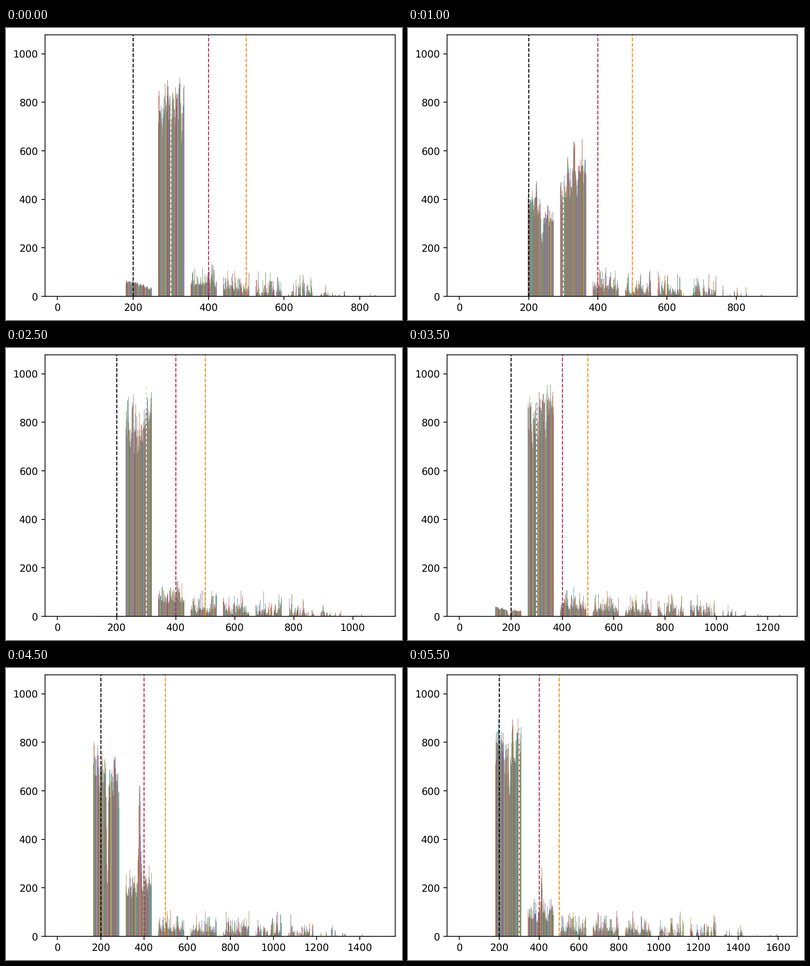
Animation, 872 px wide and 642 px high, one loop 8000 ms. Source, as a matplotlib script:

```python
import numpy as np
import matplotlib.pyplot as plt
from matplotlib.animation import FuncAnimation
from matplotlib.collections import PolyCollection
from matplotlib.colors import to_rgb
from matplotlib.ticker import MultipleLocator

W, H, DPI = 872, 642, 155.4
BINS, COLS = 10, 74
STEP_MS, FRAMES = 500, 16

# Largest value at each step; the bins always split 0..top evenly
TOPS = [860, 920, 939, 1066, 1028, 1100, 1267, 1264, 1407, 1504, 1588, 1631]

U = np.linspace(0, 1, COLS)
CYCLE = np.array([to_rgb(f"C{i}") for i in range(10)])

plt.rcParams["text.hinting"] = "none"


def smooth(rng, size=COLS):
    """Random wave between 0 and 1 that drifts over a few columns."""
    wave = np.convolve(rng.random(size + 4), [.1, .2, .4, .2, .1], "valid")
    return (wave - wave.min()) / np.ptp(wave)


def share_below(value, centre):
    """Part of each series below a value: a steep rise and a slow tail."""
    rise = 1 / (1 + np.exp((centre - value) / 9))
    tail = 1 - np.exp(-np.clip(value - centre, 0, None) / 100)
    return 0.82 * rise + 0.18 * tail


def tail_bars(b, rng):
    """Spiky low bars that thin out into clumps in the last bins."""
    peak = 105 / (1 + np.exp((b - 7.9) / 0.5))
    cut = np.clip((b - 5.5) * 0.22, -0.3, 0.8)
    h = np.clip(smooth(rng) - cut, 0, None)
    h = h * (0.25 + 0.75 * rng.random(COLS) ** 2)
    return peak * h / h.max()


def series_colors(rng):
    """Each run of ten columns uses the whole cycle, tinted by its neighbour."""
    order = np.concatenate([rng.permutation(10) for _ in range(COLS // 10 + 1)])
    rgb = CYCLE[order]
    return 0.88 * (0.65 * rgb + 0.35 * np.roll(rgb, 1, axis=0))[:COLS]


def build(step):
    top = TOPS[step]
    rng = np.random.default_rng(40 + step)
    # Series just past the middle drift to higher values as time goes on
    centre = 278 + 6 * U + 3 * smooth(rng)
    centre = centre + 3 * step * np.exp(-((U - 0.54) / 0.05) ** 2)
    total = 780 + 230 * smooth(rng) + 90 * rng.random(COLS)

    edges = np.linspace(0, top, BINS + 1)
    heights = np.zeros((BINS, COLS))
    for b, (lo, hi) in enumerate(zip(edges, edges[1:])):
        part = share_below(hi, centre) - share_below(lo, centre)
        if hi < 290:
            heights[b] = total * part
        elif lo < 290:
            heights[b] = total * part * (0.96 + 0.06 * rng.random(COLS))
        else:
            fade = np.exp(-(lo - 290) / 70)
            heights[b] = total * part * fade + tail_bars(b, rng)
    heights[:, ::3] *= rng.uniform(0.9, 1, heights[:, ::3].shape)

    x = ((np.arange(BINS)[:, None] + 0.1 + 0.8 * U * (COLS - 1) / COLS)
         * top / BINS).ravel()
    x2 = x + 0.08 * top / COLS * 1.15
    y = heights.ravel()
    zero = np.zeros_like(x)
    verts = np.stack([np.stack(p, 1) for p in
                      [(x, zero), (x, y), (x2, y), (x2, zero)]], 1)
    return top, verts, np.tile(series_colors(rng), (BINS, 1))


SCENES = [build(i) for i in range(len(TOPS))]

fig = plt.figure(figsize=((W + 0.01) / DPI, (H + 0.01) / DPI), dpi=DPI,
                 facecolor="white")
ax = fig.add_axes([85.6 / W, 52 / H, 770.9 / W, 574.5 / H])
ax.set_ylim(0, 1077)
ax.xaxis.set_major_locator(MultipleLocator(200))
ax.yaxis.set_major_locator(MultipleLocator(200))

bars = PolyCollection([], linewidths=0, edgecolors="none", zorder=1)
bars.set_snap(False)
ax.add_collection(bars, autolim=False)
for value, color in [(200, "black"), (300, "white"), (400, "#b9254a"),
                     (500, "#f98b0c")]:
    ax.axvline(value, color=color, linestyle="--", linewidth=1)


def update(frame):
    top, verts, colors = SCENES[min(frame, len(SCENES) - 1)]
    ax.set_xlim(-0.039 * top, 1.039 * top)
    bars.set_verts(verts)
    bars.set_facecolor(colors)
    return [bars]


anim = FuncAnimation(fig, update, frames=FRAMES, interval=STEP_MS,
                     init_func=lambda: update(0), repeat=True, repeat_delay=0,
                     blit=False)
plt.show()
```
